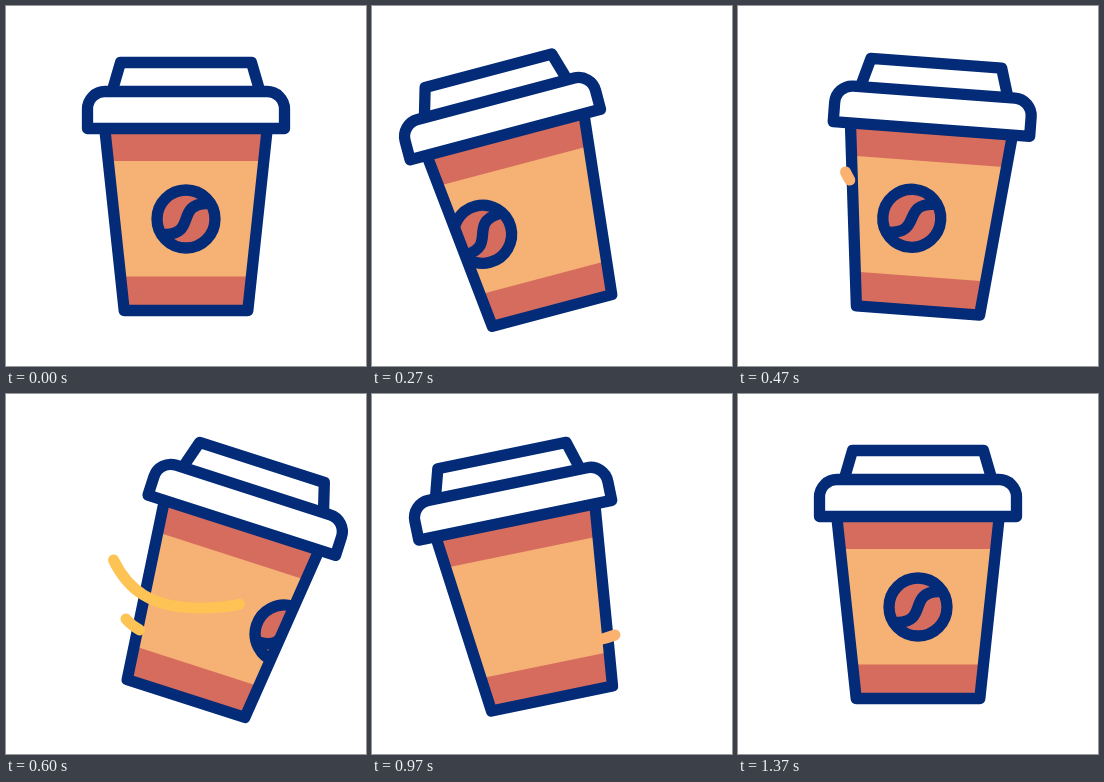
An HTML page that plays this animation: 360 px wide and 360 px high, repeating every 2000 ms.

```html
<!DOCTYPE html>
<html lang="en">
<head>
<meta charset="utf-8">
<title>Coffee cup</title>
<style>
  html, body { margin: 0; width: 100%; height: 100%; overflow: hidden; background: #fff; }
  svg { display: block; width: 100%; height: 100%; }
  .ink { stroke: #032b78; stroke-width: 11.3; stroke-linecap: round; stroke-linejoin: round; }
  .swoosh { fill: none; stroke-width: 11; stroke-linecap: round; }
</style>
</head>
<body>
<svg viewBox="0 0 360 360">
  <defs>
    <clipPath id="body"><path d="M98.700 122 L118.200 304.500 H241.800 L261.300 122 Z"/></clipPath>
  </defs>
  <g id="cup">
    <g clip-path="url(#body)">
      <rect x="90" y="120" width="180" height="190" fill="#d56c5e"/>
      <rect x="90" y="155" width="180" height="115.500" fill="#f6b175"/>
      <g id="bean" class="ink">
        <circle cx="180" cy="213" r="29" fill="#d56c5e"/>
        <path d="M200 197.500 C170 199 190 227 160 228.500" fill="none"/>
      </g>
    </g>
    <g class="ink" fill="none">
      <path d="M98.700 122 L118.200 304.500 H241.800 L261.300 122"/>
      <path d="M106.500 84 L114.500 56.500 H245.500 L253.500 84" fill="#fff"/>
      <path d="M81.500 122.500 V103 A17.500 17.500 0 0 1 99 85.500 H261 A17.500 17.500 0 0 1 278.500 103 V122.500 Z" fill="#fff"/>
    </g>
  </g>
  <path id="upper" class="swoosh" d="M107.500 166 C122 196 145 213 190 214 S270 203 292 180"/>
  <path id="lower" class="swoosh" d="M120 225 C138 246 190 260 243 241"/>
</svg>
<script>
  const LOOP = 2000, FPS = 30;
  const $ = id => document.getElementById(id);
  const cup = $('cup'), bean = $('bean');
  const clamp = v => Math.min(1, Math.max(0, v));
  const smooth = t => t * t * (3 - 2 * t);
  // CSS-like cubic-bezier(x1, 0, x2, 1)
  const bezier = (x1, x2) => x => {
    let lo = 0, hi = 1, s = 0.5;
    for (let i = 0; i < 24; i++) {
      s = (lo + hi) / 2;
      const at = 3 * (1 - s) * (1 - s) * s * x1 + 3 * (1 - s) * s * s * x2 + s ** 3;
      if (at < x) lo = s; else hi = s;
    }
    return smooth(s);
  };
  const settle = bezier(0.33, 0.41);
  const speedUp = t => t ** 2.28;
  const slowDown = t => 1 - (1 - t) ** 3.12;
  const jump = () => 1;
  const ramp = (n, from, to) => smooth(clamp((n - from) / (to - from)));

  // Each key: [frame, value, easing towards it]
  const swing = [[0, 0], [8.5, -15, smooth], [18.4, 18, smooth], [28.5, -11.7, smooth], [41, 0, settle]];
  const slide = [[0, 0], [8.5, -48, smooth], [20, 140, speedUp], [28.5, -140, jump], [41, 0, slowDown]];

  function sample(keys, n) {
    for (let i = 1; i < keys.length; i++) {
      const [start, a] = keys[i - 1], [end, b, ease] = keys[i];
      if (n <= end) return a + (b - a) * ease((n - start) / (end - start));
    }
    return keys[keys.length - 1][1];
  }

  const swooshes = [
    { el: $('upper'), head: [13, 21], tail: [19, 29] },
    { el: $('lower'), head: [16, 24.6], tail: [19, 31.6] }
  ];
  for (const s of swooshes) s.len = s.el.getTotalLength();

  const mix = (a, b, k) => 'rgb(' + a.map((v, i) => Math.round(v + (b[i] - v) * k)) + ')';
  const ORANGE = [251, 177, 112], YELLOW = [255, 201, 76];

  function draw(n) {
    cup.setAttribute('transform', `rotate(${sample(swing, n)} 180 304.5)`);
    bean.setAttribute('transform', `translate(${sample(slide, n)} 0)`);
    const color = mix(ORANGE, YELLOW, ramp(n, 14, 20) - ramp(n, 24, 29));
    for (const { el, head, tail, len } of swooshes) {
      const from = ramp(n, ...tail) * len, to = ramp(n, ...head) * len;
      el.style.display = to - from > 0.5 ? '' : 'none';
      el.style.stroke = color;
      el.style.strokeDasharray = `${to - from} ${len * 2}`;
      el.style.strokeDashoffset = -from;
    }
  }

  const begin = performance.now();
  function tick() {
    const t = (performance.now() - begin) % LOOP;
    draw(Math.floor(t * FPS / 1000 + 0.15));
    requestAnimationFrame(tick);
  }
  tick();
</script>
</body>
</html>
```
